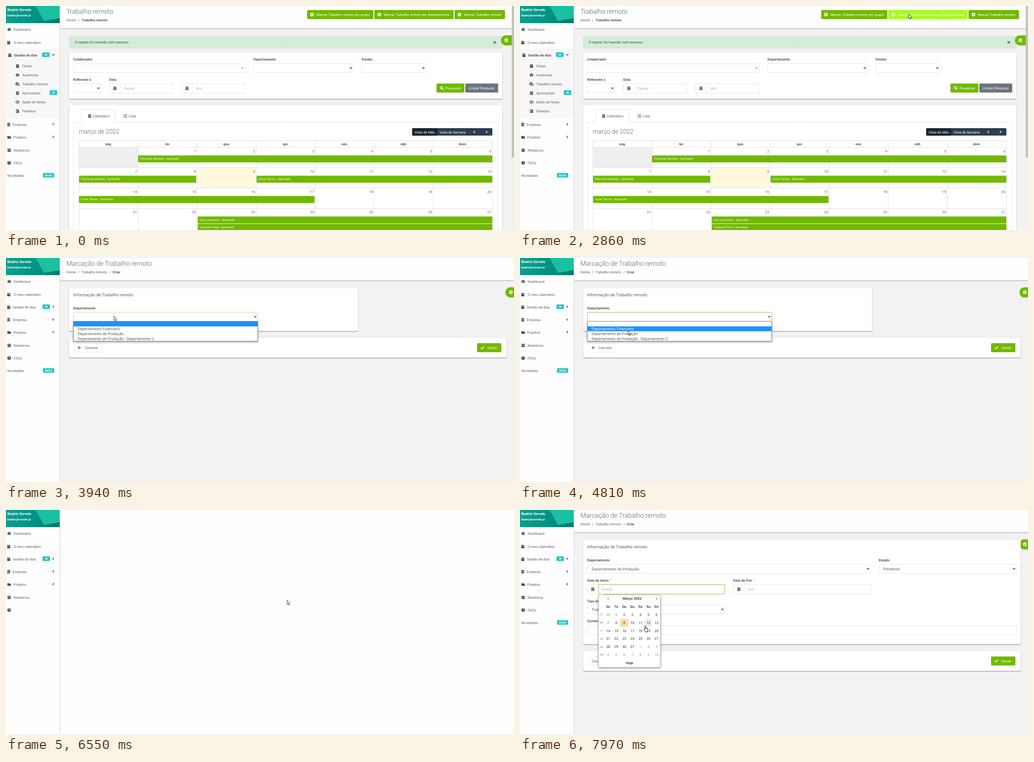
Animation of 1127 by 497 pixels, one loop 8 s. Source, as an HTML page with a canvas:

```html
<!DOCTYPE html>
<html lang="pt">
<head>
<meta charset="utf-8">
<title>Trabalho remoto</title>
<style>
html, body { margin: 0; width: 100%; height: 100%; overflow: hidden; background: #fff; }
canvas { display: block; width: 1127px; height: 497px; }
</style>
</head>
<body>
<canvas id="stage"></canvas>
<script>
const W = 1127, H = 497, LOOP = 8000;
const GREEN = '#71b900', LIME = '#a6fb20', TEAL = '#23c6c8', INK = '#5c5f61', EDGE = '#e4e5e7';
const cv = document.getElementById('stage'), g = cv.getContext('2d');
const dpr = window.devicePixelRatio || 1;
cv.width = W * dpr;
cv.height = H * dpr;

// ---------- basic drawing ----------
function box(x, y, w, h, fill, r = 0, stroke) {
  g.beginPath();
  if (stroke) g.roundRect(x + .5, y + .5, w - 1, h - 1, r);
  else g.roundRect(x, y, w, h, r);
  if (fill) { g.fillStyle = fill; g.fill(); }
  if (stroke) { g.strokeStyle = stroke; g.lineWidth = 1; g.stroke(); }
}
// y is the middle of the capital letters
function text(s, x, y, { size = 7.75, weight = 400, color = INK, align = 'left' } = {}) {
  g.font = `${weight} ${size}px Roboto, sans-serif`;
  g.fillStyle = color;
  g.textAlign = align;
  g.fillText(s, x, y + size * .355);
}
const bold = (s, x, y, o = {}) => text(s, x, y, { weight: 700, color: '#55585a', ...o });
function line(pts, color = INK, width = 1.2, close) {
  g.beginPath();
  pts.forEach(([x, y], i) => i ? g.lineTo(x, y) : g.moveTo(x, y));
  if (close) g.closePath();
  g.strokeStyle = color;
  g.lineWidth = width;
  g.stroke();
}
function poly(pts, fill) {
  g.beginPath();
  pts.forEach(([x, y]) => g.lineTo(x, y));
  g.closePath();
  g.fillStyle = fill;
  g.fill();
}
function disc(x, y, r, fill) {
  g.beginPath();
  g.arc(x, y, r, 0, 7);
  g.fillStyle = fill;
  g.fill();
}
function shadowed(blur, dy, color, draw) {
  g.save();
  g.shadowBlur = blur * dpr;
  g.shadowOffsetY = dy * dpr;
  g.shadowColor = color;
  draw();
  g.restore();
}
const card = (x, y, w, h) =>
  shadowed(2, 1, 'rgba(0,0,0,.45)', () => box(x, y, w, h, '#fff', 1));
function chevron(x, y, dx, dy, color = '#444', width = 1.3) {
  line(dx ? [[x - dx, y - 2.6], [x + dx, y], [x - dx, y + 2.6]]
          : [[x - 2.5, y - dy], [x, y + dy], [x + 2.5, y - dy]], color, width);
}

// ---------- icons ----------
const icons = {
  calendar(x, y, c) {
    box(x - 3.5, y - 3, 7, 7, c, .8);
    box(x - 2.3, y - 4, 1.2, 2, c);
    box(x + 1.1, y - 4, 1.2, 2, c);
    box(x - 3.5, y - 1.3, 7, .7, '#fff');
  },
  grid(x, y, c) {
    icons.calendar(x, y, c);
    for (let i = 0; i < 6; i++) box(x - 2.5 + i % 3 * 2, y + .2 + (i / 3 | 0) * 1.8, 1, .9, '#fff');
  },
  check(x, y, c) {
    icons.calendar(x, y, c);
    line([[x - 1.6, y + 1.2], [x - .4, y + 2.4], [x + 1.8, y]], '#fff', .8);
  },
  day(x, y, c) {
    icons.calendar(x, y, c);
    box(x - 2.4, y + .2, 2, 2, '#fff');
  },
  home(x, y, c) {
    line([[x - 4.4, y + .2], [x, y - 3.4], [x + 4.4, y + .2]], c, 1.1);
    poly([[x - 3, y + .3], [x, y - 2.2], [x + 3, y + .3], [x + 3, y + 3.8], [x + .9, y + 3.8],
      [x + .9, y + 1.5], [x - .9, y + 1.5], [x - .9, y + 3.8], [x - 3, y + 3.8]], c);
  },
  laptop(x, y, c) {
    icons.home(x - .8, y - .4, c);
    box(x, y, 5, 4.2, '#f7f7f7');
    box(x + .6, y + .7, 3.6, 2.4, null, 0, c);
    box(x - .2, y + 3.2, 5, .9, c);
  },
  scale(x, y, c) {
    box(x - .5, y - 3.5, 1, 7, c);
    box(x - 3, y - 2.8, 6, .9, c);
    box(x - 2, y + 3, 4, .9, c);
    for (const s of [-3, 3]) {
      line([[x + s - 1.6, y + 1], [x + s, y - 2.3], [x + s + 1.6, y + 1]], c, .7);
      box(x + s - 1.8, y + .7, 3.6, 1.2, c, .6);
    }
  },
  building(x, y, c) {
    box(x - 3, y - 4, 6, 8, c);
    for (let i = 0; i < 6; i++) box(x - 1.8 + i % 2 * 2.4, y - 3 + (i / 2 | 0) * 1.9, 1.1, 1, '#fff');
    box(x - .6, y + 2.6, 1.2, 1.4, '#fff');
  },
  folder(x, y, c) {
    box(x - 4, y - 3, 3.6, 3, c, .6);
    box(x - 4, y - 2, 8, 5, c, .6);
  },
  archive(x, y, c) {
    box(x - 4, y - 3.5, 8, 2, c, .4);
    box(x - 3.5, y - 1, 7, 4.5, c, .4);
    box(x - 1.2, y - .2, 2.4, .8, '#fff');
  },
  help(x, y, c) {
    disc(x, y, 4, c);
    text('?', x, y, { size: 6.5, weight: 700, color: '#fff', align: 'center' });
  },
  plus(x, y, c, ink = GREEN) {
    disc(x, y, 4, c);
    box(x - 2.3, y - .6, 4.6, 1.2, ink);
    box(x - .6, y - 2.3, 1.2, 4.6, ink);
  },
  list(x, y, c) {
    for (let i = -1; i < 2; i++) {
      box(x - 4, y + i * 2.7 - .6, 1.4, 1.3, c);
      box(x - 1.7, y + i * 2.7 - .5, 5.7, 1.1, c);
    }
  },
  search(x, y, c) {
    g.beginPath();
    g.arc(x - .8, y - .8, 2.5, 0, 7);
    g.strokeStyle = c;
    g.lineWidth = 1.3;
    g.stroke();
    line([[x + 1, y + 1], [x + 3.6, y + 3.6]], c, 1.6);
  },
  tick: (x, y, c) => line([[x - 3.6, y], [x - 1.2, y + 2.5], [x + 3.8, y - 2.7]], c, 1.7),
  back(x, y, c) {
    line([[x - 3.2, y], [x + 3.5, y]], c, 1.2);
    line([[x, y - 3], [x - 3.1, y], [x, y + 3]], c, 1.2);
  }
};
const icon = (name, x, y, c = '#4d5052') => icons[name](x, y, c);

// ---------- shared parts ----------
function badge(s, x, y, w) {
  box(x, y - 5, w, 10, TEAL, 1.5);
  text(s, x + w / 2, y, { size: 5.8, weight: 700, color: '#fff', align: 'center' });
}
function sidebar(mode) {
  const open = mode === 'open', loading = mode === 'loading';
  box(0, 0, 119, H, '#fefefe');
  box(119, 0, 1, H, '#dcdcdd');
  box(120, 0, 1, H, '#ececed');
  const sky = g.createLinearGradient(0, 0, 119, 38);
  sky.addColorStop(0, '#12a08e');
  sky.addColorStop(.55, '#009283');
  sky.addColorStop(1, '#00756d');
  box(0, 0, 119, 38, sky);
  poly([[66, 0], [119, 0], [119, 27], [84, 33]], '#1ac0a0');
  bold('Beatriz Sorvelo', 3, 8, { color: '#fff' });
  bold('beatriz@vornaki.pt', 3, 20.5, { color: '#fff', size: 6.1 });

  icon('home', 7, 52); text('Dashboard', 17, 52);
  icon('calendar', 6, 81); text('O meu calendário', 17, 81);
  if (open) {
    box(0, 95, 119, 154, '#f7f7f7');
    icon('calendar', 8.5, 109);
    bold('Gestão de dias', 18, 109);
    badge('46', 80, 108, 16.5);
    chevron(105, 108, 0, 1.3);
    [['calendar', 'Férias'], ['home', 'Ausências'], ['laptop', 'Trabalho remoto'],
     ['check', 'Aprovações'], ['scale', 'Saldo de férias'], ['day', 'Feriados']].forEach(([ic, s], i) => {
      icon(ic, 25.5, 133 + i * 20);
      text(s, 36, 133 + i * 20);
    });
    badge('46', 97, 192, 16.5);
  } else {
    icon('calendar', 6, 109);
    text('Gestão de dias', 15, 109);
    badge('46', 81, 108, 16.5);
    chevron(105, 108, -1.2, 0);
  }
  const y = open ? 263 : 137;
  icon('building', 6, y); text('Empresa', 15, y); chevron(105, y - .5, -1.2, 0);
  icon('folder', 7, y + 28.3); text('Projetos', 16, y + 28.3); chevron(105, y + 27.5, -1.2, 0);
  icon('archive', 7, y + 57); text('Relatórios', 17, y + 57);
  icon('help', 7, y + 85);
  if (loading) return;
  text("FAQ's", 17, y + 85);
  text('Novidades', 3, y + 113.5);
  badge('NOVO', 82, y + 112.5, 25);
}
function topBar(title, right) {
  box(120, 0, right - 120, H, '#f2f2f2');
  shadowed(3, 1, 'rgba(0,0,0,.3)', () => box(121, -5, right - 121, 54, '#fefefe'));
  text(title, 134, 11.5, { size: 14.4, weight: 300 });
  text('Home', 134, 31);
  text('/', 159.5, 31);
}
function sideTab(x, right) {
  g.beginPath();
  g.roundRect(x, 65, right - x, 22.5, [11, 0, 0, 11]);
  g.fillStyle = GREEN;
  g.fill();
  icon('plus', x + 12, 76, '#fff');
}
function button(x, y, w, fill, s, tx, ic, ix) {
  box(x, y, w, 20, fill, 2);
  if (ic) icons[ic](ix, y + 10, '#fff', fill);
  text(s, tx, y + 10, { color: '#fff' });
}
function select(x, y, w, s = '', edge = EDGE) {
  box(x, y, w, 21, '#fff', 1, edge);
  chevron(x + w - 6, y + 10.3, 0, 1.3, '#333', 1.4);
  text(s, x + 10, y + 10.5, { size: 8.64 });
}
function dateField(x, y, w, hint, edge = EDGE) {
  box(x, y, w, 22, '#fff', 1, EDGE);
  box(x + 24, y, w - 24, 22, '#fff', 1, edge);
  icon('grid', x + 12.5, y + 10.5);
  text(hint, x + 32, y + 10.5, { size: 8.64, color: '#b4b6b8' });
}

// ---------- calendar page ----------
const mix = (a, b, p) => {
  const ch = (h, i) => parseInt(h.substr(i, 2), 16);
  return `rgb(${[1, 3, 5].map(i => Math.round(ch(a, i) + (ch(b, i) - ch(a, i)) * p))})`;
};
function event(x, y, x2, name) {
  box(x, y, x2 - x, 15.5, GREEN, 1);
  text(name + ' - Aprovado', x + 4.5, y + 7.5, { size: 6.6, color: '#fff' });
}
function calendarPage(hoverGroup, hoverDept) {
  topBar('Trabalho remoto', 1122);
  bold('Trabalho remoto', 167.5, 31);
  button(668, 9, 147, mix(GREEN, LIME, hoverGroup), 'Marcar Trabalho remoto por grupo', 688.5, 'plus', 679);
  button(817, 9, 176, mix(GREEN, LIME, hoverDept), 'Marcar Trabalho remoto por departamento', 838, 'plus', 828);
  button(995, 9, 112, GREEN, 'Marcar Trabalho remoto', 1016, 'plus', 1006);

  box(140, 67, 961, 27, '#d4edda', 1, '#c6e6ce');
  text('O registo foi inserido com sucesso', 152.5, 80.5, { color: '#2b4c35' });
  line([[1081.5, 78], [1087, 83.5]], '#4a5a4f', 1.5);
  line([[1087, 78], [1081.5, 83.5]], '#4a5a4f', 1.5);
  sideTab(1098, 1122);

  card(140, 104, 961, 102);
  bold('Colaborador', 149, 118);
  box(149, 128, 382, 20, '#fff', 1, EDGE);
  poly([[522.3, 136.8], [527.3, 136.8], [524.8, 139.8]], '#888');
  bold('Departamento', 549, 118);
  select(549, 127, 222);
  bold('Estado', 789, 118);
  select(789, 127, 143);
  bold('Referente a', 149, 163.5);
  select(149, 172, 62);
  bold('Data', 229, 163.5);
  dateField(229, 172, 142, 'Desde');
  dateField(389, 172, 142, 'Até');
  button(955, 172, 62, GREEN, 'Pesquisar', 975, 'search', 967);
  button(1019, 172, 73, '#6c757d', 'Limpar Pesquisa', 1026);

  card(140, 220, 961, 300);
  box(149, 258, 943, 260, '#fff', 0, EDGE);
  g.beginPath();
  g.roundRect(167.5, 229.5, 75, 34, 2);
  g.fillStyle = '#fff';
  g.fill();
  g.strokeStyle = '#dee2e6';
  g.stroke();
  box(166, 259, 78, 6, '#fff');
  icon('grid', 185.5, 244); text('Calendário', 192.5, 244);
  icon('list', 264.5, 244); text('Lista', 272, 244);
  text('março de 2022', 161.5, 278.5, { size: 13.65, weight: 300 });

  box(901, 271, 178, 16.5, '#2c3e50', 2);
  box(901, 271, 56, 16.5, '#1a252f', 2);
  text('Vista de Mês', 906.5, 280, { color: '#fff' });
  text('Vista de Semana', 961.5, 280, { color: '#fff' });
  chevron(1039, 279.5, -1.5, 0, '#fff');
  chevron(1066, 279.5, 1.5, 0, '#fff');

  box(162, 314, 131, 45, '#efefef');
  box(424, 359, 131, 45, '#fff9dd');
  for (let i = 0; i < 8; i++) box(161.5 + i * 131, 298, 1, 200, '#dfdfdf');
  for (const y of [298, 313, 358, 403, 449]) box(162, y, 917, 1, '#dfdfdf');
  ['seg.', 'ter.', 'qua.', 'qui.', 'sex.', 'sáb.', 'dom.'].forEach((s, i) =>
    bold(s, 227.5 + i * 131, 306, { align: 'center' }));
  for (let d = 1; d <= 27; d++)
    text(d, 290.5 + d % 7 * 131, 322 + (d / 7 | 0) * 45.2, { align: 'right' });
  event(293, 331.5, 1079, 'Filomena Sardeira');
  event(162, 376.5, 422, 'Filomena Sardeira');
  event(556, 376.5, 1079, 'Ivone Taroso');
  event(162, 421.5, 684.5, 'Ivone Taroso');
  event(425.5, 467, 1079, 'Eva Lourminho');
  event(425.5, 483.5, 1079, 'Gonçalo Preva');

  box(1122, 0, 5, H, '#f1f1f1');
  box(1122, 0, 5, 336, '#c1c1c1');
  sidebar('open');
}

// ---------- form pages ----------
const DEPT = 'Departamento de Produção';
function formTop(w, h) {
  topBar('Marcação de Trabalho remoto', W);
  text('Trabalho remoto', 167.5, 31);
  text('/', 229.5, 31);
  bold('Criar', 236.5, 31);
  sideTab(1108, W);
  card(140, 67, w, h);
  text('Informação de Trabalho remoto', 149, 82, { size: 9.5 });
  bold('Departamento', 149, 111);
  sidebar('closed');
}
function formActions(y, arrow) {
  card(140, y, 971, 44);
  box(152, y + 12, arrow ? 61 : 48, 20, '#fff', 2, '#ececed');
  if (arrow) icon('back', 163, y + 22);
  text('Cancelar', arrow ? 174 : 159.5, y + 22);
  button(1045, y + 12, 54, GREEN, 'Gravar', 1068, 'tick', 1057);
}
function options(alpha, active) {
  g.globalAlpha = alpha;
  shadowed(4, 2, 'rgba(0,0,0,.35)', () => box(149, 140.5, 410, 44, '#fff'));
  ['', 'Departamento Financeiro', DEPT, DEPT + ' - Departamento C'].forEach((s, i) => {
    const y = 141 + i * 10.8;
    if (i === active) box(149, y, 410, 10.8, '#1e90ff');
    text(s, 159, y + 5.2, { size: 8.35, color: i === active ? '#fff' : '#555' });
  });
  box(149, 140, 410, 45, null, 0, '#7d7d7d');
  g.globalAlpha = 1;
}
function deptPage(t, cur) {
  formTop(641, 95);
  const edge = t < 3850 ? EDGE : t < 4030 ? '#c8dc9f' : '#86c232';
  select(149, 120, 410, t >= 5680 ? DEPT : '', edge);
  formActions(177, true);
  if (t >= 3850 && t < 5760) {
    const alpha = t < 3940 ? .6 : t < 5680 ? 1 : .3;
    options(alpha, cur.y < 152 ? 0 : cur.y < 163 ? 1 : 2);
  }
}
function required(x, y) { text('*', x, y, { size: 6, color: '#e0505c' }); }
function fullPage(t) {
  formTop(971, 231);
  select(149, 120, 629, DEPT);
  bold('Estado', 796, 111);
  select(796, 120, 306, 'Pendente');
  bold('Data de Início', 149, 156);
  required(199.5, 156);
  bold('Data de Fim', 473, 156);
  required(517, 156);
  dateField(149, 165, 306, 'Desde', t >= 7350 ? '#86c232' : EDGE);
  dateField(473, 165, 306, 'Até');
  if (t >= 7350 && t < 7900) box(180.5, 170, .8, 11, '#444');
  bold('Tipo de Trabalho', 149, 202);
  select(149, 210, 306, 'Trabalho remoto');
  bold('Comentários', 149, 246.5);
  box(149, 256, 953, 21, '#fff', 1, EDGE);
  formActions(313, false);
  if (t >= 7430) picker(t < 7510 ? .55 : 1, t >= 7970);
}
function picker(alpha, hover) {
  const mid = { align: 'center', color: '#444' }, step = 17.9, x0 = 195.5;
  g.globalAlpha = alpha;
  shadowed(5, 2, 'rgba(0,0,0,.4)', () => box(174, 188, 138, 161, '#fff', 2));
  box(173.5, 188, 138.5, 161.5, '#fff', 2, '#b5b5b5');
  poly([[177.5, 188.5], [181, 185], [184.5, 188.5]], '#fff');
  bold('«', x0, 196.5, mid);
  bold('Março 2022', 249, 196.5, mid);
  bold('»', 303, 196.5, mid);
  ['Se', 'Te', 'Qu', 'Qu', 'Se', 'Sa', 'Do'].forEach((s, i) => bold(s, x0 + i * step, 214, mid));
  box(222.5, 241.5, 17.5, 17.5, '#ffdb99', 2);
  if (hover) box(276, 241.5, 17.5, 17.5, '#eee', 2);
  for (let r = 0; r < 6; r++) {
    const y = 232 + r * step;
    text(9 + r, 180.5, y, { ...mid, size: 5.6 });
    for (let c = 0; c < 7; c++) {
      const n = r * 7 + c, out = n < 1 || n > 31;
      text(n < 1 ? 28 : n > 31 ? n - 31 : n, x0 + c * step, y, { ...mid, color: out ? '#999' : '#333' });
    }
  }
  bold('Hoje', 243, 339, mid);
  g.globalAlpha = 1;
}
function blankPage() {
  box(0, 0, W, H, '#fefefe');
  sidebar('loading');
}

// ---------- pointer ----------
// start, end, steps, target x, target y
const moves = [
  [520, 520, 1, 400, 446], [598, 1300, 10, 770, 17], [1380, 1450, 2, 828, 17],
  [1530, 1680, 3, 880, 18], [2230, 2410, 3, 862.5, 18], [3320, 3780, 6, 239.5, 129],
  [4430, 4810, 6, 239.5, 161], [5440, 5440, 1, 240.5, 165], [6290, 6450, 3, 623.5, 200],
  [6640, 7020, 5, 410, 171], [7100, 7350, 4, 320, 175.5], [7900, 7900, 1, 302, 222],
  [7970, 7970, 1, 278, 257]
];
function pointer(t) {
  let x = 400, y = 446;
  for (const [a, b, n, tx, ty] of moves) {
    if (t < a) break;
    const k = a === b ? n : Math.min(n, Math.floor((t - a) / (b - a) * (n - 1) + 1e-6) + 1);
    x += (tx - x) * k / n;
    y += (ty - y) * k / n;
  }
  return { x, y };
}
function drawPointer(t, { x, y }) {
  if (t < 520) return;
  g.save();
  g.translate(x, y);
  g.lineJoin = 'round';
  if (t >= 7350 && t < 7900) {
    line([[-1.8, -5], [0, -4.5], [1.8, -5]], '#222', .8);
    line([[0, -4.5], [0, 4.5]], '#222', .9);
    line([[-1.8, 5], [0, 4.5], [1.8, 5]], '#222', .8);
  } else if ((t >= 1220 && t < 2860) || t >= 7970) {
    const hand = [[-1, .6], [0, 0], [1, .6], [1, 4.6], [2.6, 4.6], [4, 5.2], [5.4, 5.8], [5.9, 7],
      [5.4, 10], [4.6, 11.6], [4.6, 13.4], [-.4, 13.4], [-.8, 11.6], [-3.4, 7.8], [-2.8, 6.8], [-1, 8.2]];
    poly(hand, '#fff');
    line(hand, '#111', .9, true);
    for (const fx of [1, 2.6, 4.1]) line([[fx, 5], [fx, 7.2]], '#111', .6);
  } else {
    const arrow = [[0, 0], [0, 9.6], [2.2, 7.6], [3.7, 11], [5.1, 10.4], [3.7, 7.1], [6.6, 6.9]];
    poly(arrow, '#fff');
    line(arrow, '#222', .9, true);
  }
  g.restore();
}

// ---------- timeline ----------
const ramp = (t, a, b) => Math.min(1, Math.max(0, (t - a) / (b - a)));
function draw(t) {
  g.setTransform(dpr, 0, 0, dpr, 0, 0);
  g.textRendering = 'geometricPrecision';
  const cur = pointer(t);
  if (t < 3160) calendarPage(ramp(t, 1200, 1300) - ramp(t, 1530, 1680), ramp(t, 1530, 1680));
  else if (t < 3320) blankPage();
  else if (t < 6450) deptPage(t, cur);
  else if (t < 6640) blankPage();
  else fullPage(t);
  drawPointer(t, cur);
}
const start = performance.now();
function tick() {
  draw((performance.now() - start) % LOOP);
  requestAnimationFrame(tick);
}
tick();
</script>
</body>
</html>
```
